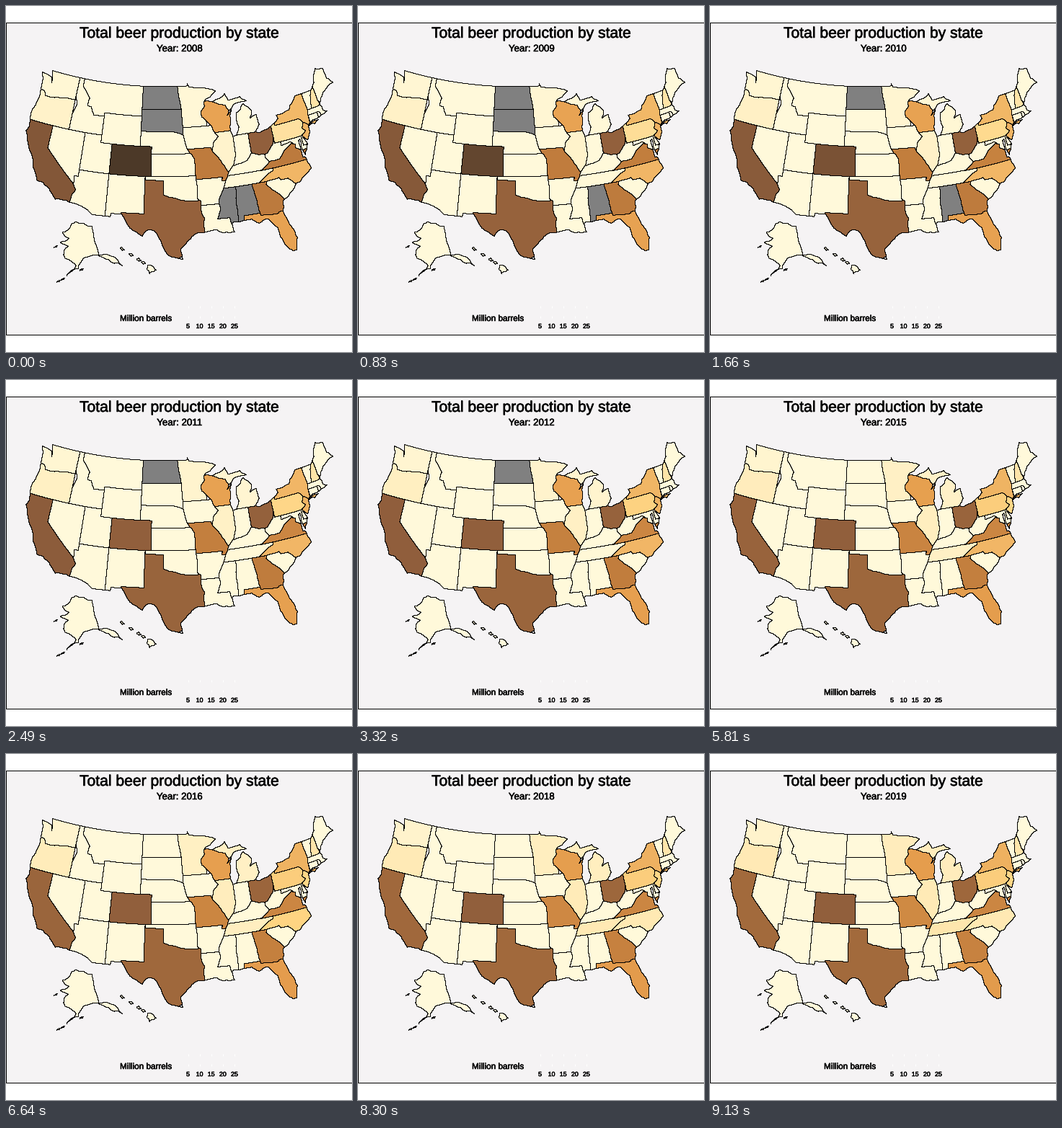
A matplotlib script that plays this animation: 480 px wide and 480 px high, repeating every 9.96 s.

```python
import numpy as np
import matplotlib.pyplot as plt
from matplotlib.animation import FuncAnimation
from matplotlib.colors import LinearSegmentedColormap
from matplotlib.patches import Polygon, Rectangle
from matplotlib.patheffects import withStroke

SIZE, DPI = 480, 100
PX = 72 / DPI
FIRST_YEAR, YEARS, INTERVAL = 2008, 12, 830
TOP = 26.0
MISSING = (0.5, 0.5, 0.5)
STOPS = ((0, "#fffadc"), (5, "#fed482"), (10, "#e59d4d"),
         (15, "#c17d3d"), (20, "#915f3c"), (TOP, "#4c3928"))
CMAP = LinearSegmentedColormap.from_list("ale", [(v / TOP, c) for v, c in STOPS], N=512)

# Million barrels: start, end and, where the change is short, its years.
TRENDS = {
    "CO": (26, 20, 2008, 2011), "CA": (21.2, 18.2), "TX": (19.6, 18.2),
    "OH": (20, 18.6), "MO": (15.3, 13), "VA": (15.5, 13.6, 2008, 2011),
    "GA": (15.5, 14.2), "FL": (9.5, 10.4), "WI": (9.4, 10), "NY": (7.5, 8.2),
    "NC": (7.7, 2.3, 2015, 2017), "NJ": (8, 4.8, 2014, 2015), "PA": (3.4, 5.6, 2008, 2013),
    "NH": (3, 2.8), "OR": (1.1, 2.2), "WA": (0.5, 0.9), "IL": (0.9, 2.1),
    "TN": (0.3, 2.6, 2012, 2019), "MN": (0.4, 1.8), "MI": (0.2, 1.8),
}
FIRST_KNOWN = {"ND": 2013, "SD": 2010, "MS": 2009, "AL": 2011}

rng = np.random.default_rng(4)
fig = plt.figure(figsize=(SIZE / DPI, SIZE / DPI), dpi=DPI, facecolor="white")
ax = fig.add_axes([0, 0, 1, 1])
ax.axis("off")
ax.add_patch(Rectangle((0.5, 23.5), SIZE + 2, 433, facecolor="#f5f3f4",
                       edgecolor="black", lw=PX, snap=False))
shapes = []


def project(pts):
    """Lambert azimuthal equal-area about 45N 100W, in stage pixels."""
    d, p = np.radians(100 - pts[:, 0]), np.radians(pts[:, 1])
    h = np.sqrt(0.5)
    k = np.sqrt(2 / (1 + h * np.sin(p) + h * np.cos(p) * np.cos(d)))
    x = k * np.cos(p) * np.sin(d)
    y = k * h * (np.sin(p) - np.cos(p) * np.cos(d))
    return np.column_stack((218.2 + 597 * x, 153.6 - 597 * y))


def roughen(pts, amount):
    """Shift midpoints of slanted edges sideways, twice."""
    for _ in range(2):
        step = np.roll(pts, -1, axis=0) - pts
        shift = rng.uniform(-amount, amount, len(pts)) * (step != 0).all(axis=1)
        mid = pts + step / 2 + shift[:, None] * step[:, ::-1] * (1, -1)
        pts = np.stack((pts, mid), axis=1).reshape(-1, 2)
    return pts


def trace(coords, amount, to_stage):
    """Closed one-pixel-wide line running through pixel centres."""
    pts = roughen(np.array(coords, float).reshape(-1, 2), amount)
    t = np.linspace(0, 1, 60, endpoint=False)[:, None]
    dense = [a + (b - a) * t for a, b in zip(pts, np.roll(pts, -1, axis=0))]
    return np.floor(to_stage(np.vstack(dense))) + 0.5


def outline(points, **style):
    return ax.add_patch(Polygon(points, closed=True, edgecolor="black", lw=PX,
                                joinstyle="bevel", snap=False, **style))


# Degrees west and north in turn, counterclockwise from the north-west.
pacific = (124.7, 48.4, 124.1, 46.9, 124, 46.2, 124.1, 44, 124.5, 42.8, 124.1, 41,
           124.4, 40.4, 123.8, 39.3, 122.4, 37.6, 121.9, 36.6, 120.6, 34.5, 119.2, 34.15,
           118.4, 33.8, 117.1, 32.55)
south = (114.8, 32.5, 111.07, 31.33, 108.2, 31.33, 108.2, 31.78, 106.5, 31.78, 104.5, 29.65,
         103.2, 28.98, 102.6, 29.75, 101.4, 29.77, 100.3, 28.28, 99.2, 26.4, 97.15, 25.87)
gulf = (97.4, 27.3, 95.9, 28.6, 94.7, 29.4, 91.9, 29.6, 90.9, 29.05, 89.2, 29, 89.5, 30.2,
        88, 30.3, 86.4, 30.4, 85.3, 29.7, 84, 30.1, 82.7, 28.7, 82.5, 27.4, 81.8, 26,
        81, 25.15, 80.4, 25.2)
atlantic = (80.05, 26.8, 80.6, 28.4, 81.4, 30.4, 81.1, 32, 79.3, 33.1, 78.5, 33.86,
            77.9, 33.9, 76.6, 34.7, 75.5, 35.3, 76, 36.9, 76.4, 37, 76.4, 39.2, 76.1, 39.4,
            76.2, 38.3, 75.9, 37.2, 75.05, 38.45, 75.5, 39.5, 74.9, 38.95, 74.1, 39.8,
            74, 40.6, 73.7, 41, 71.9, 41.3, 71.1, 41.5, 70, 41.7, 70.6, 42, 70.8, 42.9,
            70.2, 43.6, 68.8, 44.4, 67, 44.85)
north_east = (67.8, 45.7, 67.8, 47.07, 69.2, 47.45, 70, 46.7, 70.4, 45.8, 71.5, 45,
              74.7, 45, 76.2, 44, 76.5, 43.5, 79.05, 43.27, 78.9, 42.8, 81.3, 41.77,
              82.7, 41.5, 83.45, 41.73)
lakes = (82.5, 42.6, 82.6, 44, 83.4, 43.9, 83.9, 43.65, 83.35, 44.6, 84.7, 45.75, 85.4, 45,
         86.2, 44.7, 86.5, 43.8, 86.2, 42.8, 86.8, 41.8, 87.5, 41.7, 87.8, 42.4, 87.5, 44.3,
         87.1, 45.2, 88, 44.55, 87.6, 45.1, 86.5, 45.85, 84, 46, 84.9, 46.5, 85, 46.75,
         87.4, 46.5, 87.9, 47.45, 90.4, 46.6, 92.1, 46.75, 89.6, 48, 92.9, 48.6)
north_west = (94.7, 48.8, 95.15, 49.35, 95.15, 49, 122.8, 49, 122.3, 47.4, 122.7, 48.15)
coast = trace(pacific + south + gulf + atlantic + north_east + lakes + north_west,
              0.09, project)
land = outline(coast, facecolor="none", zorder=2)


def state(name, *coords, wiggle=0.04):
    """Later states overlap earlier ones; the coast clips them all."""
    patch = outline(trace(coords, wiggle, project))
    patch.set_clip_path(land)
    shapes.append((name, patch))


def box(name, west, east, north, south):
    state(name, west, north, east, north, east, south, west, south)


def island(name, *coords, to_stage=lambda pts: pts):
    shapes.append((name, outline(trace(coords, 0.15, to_stage))))


box("OR", 125, 117.03, 46.5, 42)
state("WA", 125, 49.5, 117.03, 49.5, 117.03, 46, 119, 46, 121, 45.65, 122.8, 45.6,
      123.2, 46.15, 125, 46.3)
box("MT", 116.5, 104, 49.5, 44.4)
state("ID", 117.03, 49.5, 116.05, 49.5, 116.05, 48, 114.35, 46.6, 114.5, 45.6, 113.8, 45.5,
      113, 44.45, 111.05, 44.6, 111.05, 42, 117.03, 42, 117.03, 44.2, 116.5, 45.5, 117.03, 46.4)
box("CA", 125, 114, 42, 32)
state("NV", 120, 42, 114, 42, 114, 36, 114.63, 35, 120, 39, wiggle=0)
state("AZ", 114.05, 37, 109, 37, 109, 31, 114.8, 31, 114.75, 32.7, 114.6, 33.6,
      114.15, 34.3, 114.63, 35, 114.75, 36.1, 114.05, 36.1)
box("UT", 114.05, 109.05, 42, 37)
box("WY", 111.05, 104.05, 45, 41)
box("MI", 91, 82, 48, 41.7)
state("MN", 97.5, 49.5, 89, 49.5, 89, 47.7, 92, 46.6, 92, 43.4, 97.5, 43.4)
box("IA", 97, 90, 43.5, 40.4)
state("WI", 92.1, 46.7, 90.4, 47, 90.4, 46.55, 88.1, 45.9, 87.6, 45.1, 86.5, 45.3,
      86.5, 42.4, 90.65, 42.4, 91.2, 43.5, 92.8, 44.75, 92.85, 45.5, 92.1, 46.1)
state("KY", 89.5, 36.4, 82, 36.4, 82, 38.4, 84.8, 39.2, 86, 38.6, 89.5, 37.5)
state("IN", 87.6, 41.76, 84.8, 41.76, 84.8, 39.1, 85.8, 38.2, 88.1, 37.8)
state("IL", 90.65, 42.5, 87, 42.5, 87.53, 41.7, 87.53, 39.3, 88.1, 37.9, 89.1, 37,
      90.5, 38.5, 91.6, 39.9, 91.4, 40.4, 91.1, 41.2, 90.15, 41.9)
box("TN", 91, 81, 36.6, 35)
box("FL", 88, 79.5, 31.2, 24)
box("SC", 83.5, 78, 35.3, 31.9)
box("MS", 92, 88, 35, 30)
state("AL", 88.2, 35, 85.5, 35, 85, 32.9, 85, 31, 87.5, 31, 87.5, 30, 88.4, 30, 88.4, 32)
state("GA", 85.6, 35, 83.1, 35, 83.3, 34.6, 81.5, 33, 80.7, 32, 80.7, 30.7, 82.05, 30.7,
      82.2, 30.5, 84.87, 30.7, 85.1, 31.6, 85.18, 32.87)
state("LA", 95, 33, 91.17, 33, 91, 32.2, 91.6, 31, 89.75, 31, 89.5, 30, 88.5, 30,
      88.5, 28, 95, 28)
state("AR", 95, 36.6, 90.2, 36.6, 90.3, 36, 89.7, 36, 91.15, 33.5, 91.15, 33, 95, 33)
state("MO", 96, 40.6, 91.7, 40.6, 91.4, 40, 90.2, 38.7, 89.1, 37, 89.7, 36, 90.37, 36,
      90.15, 36.5, 96, 36.5)
box("NM", 109.05, 103, 37, 31)
state("TX", 103.04, 36.8, 103.04, 32, 106.62, 32, 106.62, 31, 100, 25, 93.5, 28,
      93.8, 30.3, 93.6, 31.2, 94.04, 32, 94.04, 33.55, 95, 34.2, 99.9, 35, 99.9, 36.8)
state("NE", 104.05, 43.1, 98, 43.1, 96.4, 42.5, 95.8, 40.6, 95.3, 39.9, 102.05, 39.9,
      102.05, 41, 104.05, 41)
state("KS", 102.05, 40, 95.2, 40, 94.62, 39.1, 94.62, 36.9, 102.05, 36.9)
box("CO", 109.05, 102.05, 41, 37)
state("OK", 103, 37, 94.62, 37, 94.62, 36.5, 94.43, 35.4, 94.48, 33.64, 97, 33.8,
      98.1, 34.13, 100, 34.56, 100, 36.5, 103, 36.5)
state("SD", 104.05, 46, 96.56, 46, 96.45, 42.5, 98.5, 43, 104.05, 43)
state("ND", 104.05, 49.5, 97.2, 49.5, 96.56, 45.94, 104.05, 45.94)
state("NC", 84.32, 35, 83.1, 35, 81.05, 35.15, 80.8, 34.8, 79.67, 34.8, 78.2, 33.5,
      75, 34.5, 75, 36.6, 81.68, 36.6, 81.8, 36.2, 83.1, 35.75)
state("WV", 82.6, 38.6, 80.6, 40.7, 80.52, 39.72, 79.48, 39.72, 79.4, 39.2, 77.75, 39.6,
      77.8, 39, 80, 37.3, 82, 37.4, 82.6, 38.15)
state("MD", 79.48, 39.72, 75.79, 39.72, 75.79, 38.46, 74.9, 38.46, 75.2, 37.9, 76.3, 37.8,
      77.2, 38.3, 77.2, 38.85, 77.8, 39.4, 79.48, 39.2)
state("VA", 83.7, 36.55, 75, 36.55, 75, 38, 76.3, 37.9, 77.2, 38.4, 77.05, 38.85,
      77.8, 39.13, 79.3, 38.4, 80.3, 37.5, 81.97, 37.54)
box("DE", 75.79, 74.9, 39.8, 38.46)
state("OH", 84.8, 41.72, 83.45, 41.73, 82.5, 41.9, 80.52, 42.3, 80.52, 40.6, 80.85, 39.7,
      82.2, 38.6, 83.5, 38.65, 84.8, 39.1)
state("NJ", 74.7, 41.35, 73.9, 41, 73.9, 38.8, 74.9, 38.8, 75.5, 39.6, 75.3, 40, 75.3, 41)
state("NY", 79.9, 43.5, 76, 45.2, 73.3, 45.2, 73.2, 42.7, 73.5, 42, 73.6, 40.8, 74, 40.9,
      74.7, 41.35, 75.35, 41.9, 79.9, 41.9)
state("PA", 80.52, 42.4, 79.76, 42.4, 79.76, 42, 75.35, 42, 74.7, 41.35, 75.2, 40.65,
      74.75, 40.2, 75.5, 39.83, 75.79, 39.72, 80.52, 39.72)
state("VT", 73.4, 45.2, 71.4, 45.2, 72.4, 42.6, 73.27, 42.6, 73.4, 44)
state("NH", 71.5, 45.2, 71.05, 45.5, 70.9, 43.3, 70.6, 42.6, 72.5, 42.6, 72.1, 44)
state("ME", 71.05, 46, 70, 48, 66, 48, 66, 44, 70.6, 43, 70.97, 43.4)
box("CT", 73.5, 71.8, 42.1, 40.9)
box("RI", 71.8, 71.1, 42.1, 41)
state("MA", 73.27, 42.73, 71.3, 42.73, 70.5, 42.95, 69.5, 42.5, 69.5, 41, 71.1, 41.3,
      71.4, 42.03, 73.5, 42.03)
island("NY", 74, 40.6, 73.6, 40.9, 71.9, 41.05, 72.8, 40.7, to_stage=project)

island("AK", 91, 302, 97, 299, 119, 305, 129, 346, 146, 347, 161, 360, 150, 357, 135, 349,
       119, 346, 106, 352, 100, 364, 84, 374, 97, 360, 82, 350, 80, 340, 86, 333,
       75, 328, 87, 322, 78, 314)
for x, y in ((68, 334), (72, 382), (78, 379), (104, 366)):
    island("AK", x - 2, y + 1, x + 3, y - 2, x + 2, y)
for t in (0, 0.4, 0.75, 0.95):
    x, y = 161 + 31 * t, 337 + 20 * t
    island("HI", x - 3, y - 1, x, y - 2, x + 3, y + 1, x, y + 2)
island("HI", 197, 359, 208, 366, 199, 371, 196, 366)


def label(x, y, text, px, ha="center"):
    return ax.text(x, y, text, fontsize=px * PX, family="Liberation Sans", ha=ha,
                   va="baseline", path_effects=[withStroke(linewidth=0.4, foreground="black")])


label(240.7, 44, "Total beer production by state", 21.1)
subtitle = label(240.5, 63, "", 13.3)
label(158, 437, "Million barrels", 11.7, ha="left")
ax.imshow(np.linspace(0, 1, 256)[None], cmap=CMAP, extent=(238, 323, 433, 416), aspect="auto")
for v in range(5, 30, 5):
    x = 236.4 + 3.22 * v
    for y in (416, 430):
        ax.plot((x, x), (y, y + 3), color="white", lw=PX, solid_capstyle="butt")
    label(x, 447, str(v), 8.8)
ax.set(xlim=(0, SIZE), ylim=(SIZE, 0))


def fill(name, year):
    if year < FIRST_KNOWN.get(name, 0):
        return MISSING
    start, end, *span = TRENDS.get(name, (0.15, 0.15))
    return CMAP(np.interp(year, span or (2008, 2019), (start, end)) / TOP)


def update(i):
    year = FIRST_YEAR + i
    for name, patch in shapes:
        patch.set_facecolor(fill(name, year))
    subtitle.set_text(f"Year: {year}")
    return [subtitle] + [patch for _, patch in shapes]


anim = FuncAnimation(fig, update, frames=YEARS, interval=INTERVAL, repeat=True,
                     repeat_delay=0, blit=False)
plt.show()
```
